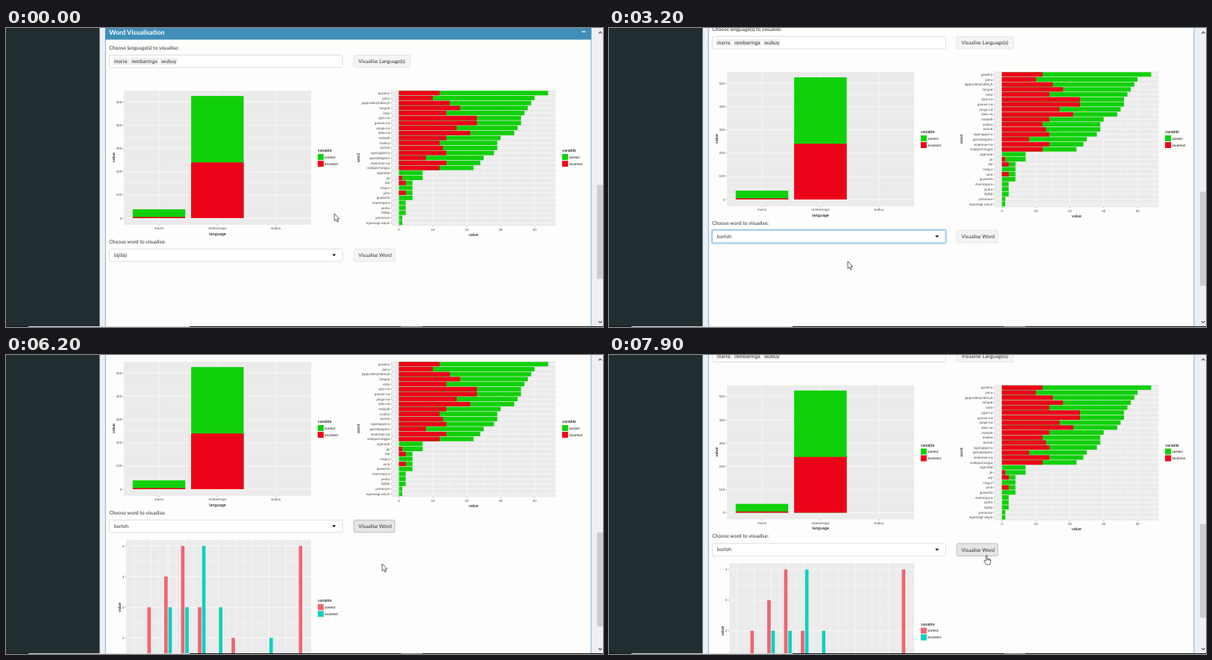
These frames come from a looping animation (800x401 px, 8000 ms). An HTML page:

```html
<!DOCTYPE html>
<html lang="en">
<head>
<meta charset="utf-8">
<title>Word Visualisation</title>
<style>
html, body { margin: 0; width: 100%; height: 100%; overflow: hidden; }
svg { display: block; width: 800px; height: 401px; text-rendering: geometricPrecision; }
text { font-family: "Liberation Sans", Arial, sans-serif; }
.ui { font-family: Lato, "Open Sans", sans-serif; }
</style>
</head>
<body>
<svg id="stage" viewBox="0 0 800 401"></svg>
<script>
const GREEN = '#10d00a', RED = '#ec0219', PINK = '#ee6670', TEAL = '#12cfc0';
const GREY = '#4d4d4d', PAPER = '#fdfdfb';

const rect = (x, y, w, h, fill, extra = '') =>
  `<rect x="${x}" y="${y}" width="${w}" height="${h}" fill="${fill}" ${extra}/>`;
const line = (x1, y1, x2, y2, color, w) =>
  `<path d="M${x1} ${y1}L${x2} ${y2}" stroke="${color}" stroke-width="${w}"/>`;
const shape = (d, fill, extra = '') => `<path d="${d}" fill="${fill}" ${extra}/>`;
const text = (x, y, s, size, fill = '#000', anchor = 'start', extra = '') =>
  `<text x="${x}" y="${y}" font-size="${size}" fill="${fill}" text-anchor="${anchor}" ${extra}>${s}</text>`;
const ui = (x, y, s, extra = '') => text(x, y, s, 6.8, '#333', 'start', 'class="ui" ' + extra);
const group = (id, body, extra = '') => `<g id="${id}" ${extra}>${body}</g>`;
const range = (n, f) => Array.from({ length: n }, (_, i) => f(i)).join('');
const chevron = (x, y, dir, color) =>
  `<path d="M${x - 2.3} ${y + dir}l2.3 ${-2.3 * dir}l2.3 ${2.3 * dir}" fill="none" stroke="${color}" stroke-width="1.1"/>`;

function legend(x, y, colors) {
  return text(x, y + 1.8, 'variable', 5.4) + ['correct', 'incorrect'].map((label, i) =>
    rect(x, y + 4.7 + i * 9, 8, 8, colors[i]) +
    text(x + 9.3, y + 10.3 + i * 9, label, 4.65)).join('');
}

const vertical = (x, y, s) => text(x, y, s, 5.5, '#000', 'middle', `transform="rotate(-90 ${x} ${y})"`);
const xLabel = (x, y, s) => line(x, y - 5, x, y - 3.6, '#555', .5) + text(x, y + 1.5, s, 4.55, GREY, 'middle');
const yLabel = (x, y, s) => line(x - 1.6, y, x, y, '#555', .5) + text(x - 2.8, y + 1.6, s, 4.55, GREY, 'end');

function languageChart() {
  const Y = v => 255 - v * .3115;
  let out = rect(158, 84, 251, 180, '#ebebeb');
  for (let v = 0; v <= 550; v += 50) out += line(158, Y(v), 409, Y(v), '#fff', v % 100 ? .3 : .6);
  [['marra', 38, 5], ['rembarrnga', 526, 240], ['wubuy', 0, 0]].forEach(([name, all, bad], i) => {
    const x = 205 + i * 78.3;
    out += line(x, 84, x, 264, '#fff', .6) + xLabel(x, 268.8, name);
    if (all) out += rect(x - 35.2, Y(all), 70.4, all * .3115, GREEN) +
      rect(x - 35.2, Y(bad), 70.4, bad * .3115, RED);
  });
  return out + range(6, i => yLabel(158, Y(i * 100), i * 100)) +
    text(283.5, 277.5, 'language', 5.5, '#000', 'middle') + vertical(146, 173.5, 'value') +
    legend(417.7, 164.3, [GREEN, RED]);
}

function wordChart() {
  const words = ('guweny 44 12,jamu 40 10,jappurdenyhdenyh 39 15,langoe 38 18,rotto 37 14,giya-na 36 23,' +
    'ganam-na 36 23,janga-na 35 17,dala-na 34 21,mobalh 30 14,mokko 29 12,borloh 29 13,nganapparru 28 14,' +
    'garndoegoen 25 8,moermoe-na 24 14,walppurrunggu 22 12,ngamdal 7 0,jin 7 1,wiji 4 2,magur 4 0,jarlu 4 2,' +
    'guwarda 4 0,marranguru 2 0,janbu 2 0,bijibiji 2 0,yarraman 1 0,ngansagi_wayin 1 0').split(',');
  const unit = 4.545, X = v => 526.5 + v * unit;
  let out = rect(516.5, 83.3, 220, 182, '#ebebeb');
  for (let v = 0; v <= 45; v += 5) out += line(X(v), 83.3, X(v), 265.3, '#fff', v % 10 ? .3 : .6);
  words.forEach((row, i) => {
    const [name, all, bad] = row.split(' '), y = 87.3 + i * 6.69;
    out += line(516.5, y, 736.5, y, '#fff', .6) + rect(X(0), y - 3, all * unit, 6, GREEN) +
      rect(X(0), y - 3, bad * unit, 6, RED) + yLabel(517, y, name.replace('_', ' '));
  });
  return out + range(5, i => xLabel(X(i * 10), 270, i * 10)) +
    text(626.5, 278.5, 'value', 5.5, '#000', 'middle') + vertical(474, 174, 'word') +
    legend(745.2, 164.3, [GREEN, RED]);
}

function levelChart() {
  const X = v => 172 + v * 22.55, Y = v => 495.5 - v * 41.1;
  const good = [0, 2, 3, 4, 2, 0, 1, 0, 0, 0, 4], bad = [0, 0, 2, 2, 4, 2, 0, 0, 1, 0, 0];
  let out = rect(161, 323, 248, 181, '#ebebeb');
  for (let v = 0; v <= 4; v += .5) out += line(161, Y(v), 409, Y(v), '#fff', v % 1 ? .3 : .6);
  for (let v = 0; v <= 10; v += .5) out += line(X(v), 323, X(v), 504, '#fff', v % 1 ? .3 : .6);
  good.forEach((n, i) => {
    out += rect(X(i) - 5.1, Y(n), 4.7, n * 41.1, PINK) +
      rect(X(i) + .5, Y(bad[i]), 4.7, bad[i] * 41.1, TEAL) + xLabel(X(i), 509, i);
  });
  return out + range(5, i => yLabel(161, Y(i), i)) +
    text(285, 518, 'level', 5.5, '#000', 'middle') + vertical(154, 413.5, 'value') +
    legend(417.7, 404.5, [PINK, TEAL]);
}

const button = (id, y, w, label) =>
  rect(466, y, w, 16.5, '#f4f4f4', `id="${id}" rx="1.5" stroke="#ddd" stroke-width=".7"`) + ui(472.3, y + 10.6, label);
const field = (id, y) => rect(138.4, y, 312.5, 16.6, '#fff', `id="${id}" rx="1.8" stroke="#d2d2d2" stroke-width=".7"`);

function dropdown() {
  const options = ['bijibiji', 'borloh', 'dala-na', 'ganam-na', 'garndoegoen', 'giya-na', 'guwarda', 'guweny'];
  return rect(137.4, 317, 314.4, 99.5, '#000', 'opacity=".08" rx="2"') +
    rect(138.4, 316, 312.5, 98.7, '#fff', 'stroke="#d0d0d0" stroke-width=".7"') +
    rect(139, 317.5, 301, 13, '#f5f5f5', 'id="hover"') +
    group('', options.map((s, i) => ui(144.7, 326.2 + i * 13, s)).join(''), 'clip-path="url(#list)"') +
    rect(440, 316.5, 10.4, 97.8, '#f1f1f1') + rect(440.4, 325.5, 9.6, 19.5, '#c4c4c4') +
    chevron(445.2, 320.5, 1, '#555') + chevron(445.2, 409.5, -1, '#555');
}

const page =
  rect(133.3, -14, 650.7, 540, PAPER, 'rx="1.5" stroke="#7fb2d0" stroke-width="1"') +
  rect(133, -14, 651.3, 29.6, '#418fb8') +
  text(138.2, 8.7, 'Word Visualisation', 8.9, '#fff', 'start', 'class="ui" font-weight="700"') +
  rect(771.5, 4.3, 5, 1.3, '#fff') +
  ui(138.2, 29, 'Choose language(s) to visualise:') + field('langs', 36.4) +
  rect(143.3, 39.8, 22, 9.6, '#efefef') + rect(166.7, 39.8, 38, 9.6, '#efefef') + rect(206.3, 39.8, 23, 9.6, '#efefef') +
  ui(145, 47, 'marra') + ui(168.2, 47, 'rembarrnga') + ui(208, 47, 'wubuy') +
  button('langButton', 36.5, 76, 'Visualise Language(s)') +
  languageChart() + wordChart() +
  ui(138.2, 288.7, 'Choose word to visualise:') +
  rect(137.2, 295.2, 314.9, 19, 'none', 'id="glow" rx="2.5" stroke="#b5daee" stroke-width="1.4"') +
  field('select', 296.3) + ui(144.7, 306.9, '', 'id="value"') +
  rect(162.3, 300.5, .6, 8.5, '#222', 'id="caret"') + shape('', '#222', 'id="arrow"') +
  button('wordButton', 296.4, 55, 'Visualise Word') +
  group('levels', levelChart()) + group('menu', dropdown());

const outline = 'stroke="#222" stroke-width=".7" stroke-linejoin="round"';
const pointers =
  group('arrowPointer', shape('M0 0V9.7L2.3 7.6L3.9 11.2L5.4 10.5L3.9 7H6.8Z', '#fff', outline)) +
  group('handPointer', shape('M-1 .4Q0 -.8 .9 .4V4.3L4.4 5Q5.8 5.3 5.7 6.8L5.2 9.5L4.4 12H-.6L-3.3 7.5Q-3.4 6 -2 6.5L-1 7.5Z', '#fff', outline) +
    shape('M1 4.3V6.4M2.6 4.7V6.5M4.2 5V6.7', 'none', outline)) +
  group('beamPointer', shape('M-2.3 -5H2.3M0 -5V5M-2.3 5H2.3', 'none', 'stroke="#111" stroke-width="1.1"'));

stage.innerHTML = '<defs><clipPath id="list"><rect x="138" y="316" width="303" height="98"/></clipPath></defs>' +
  rect(0, 0, 800, 401, '#ecf0f5') + group('page', page) + rect(0, 0, 125.5, 401, '#222d32') +
  rect(791.5, 0, 8.5, 401, '#f0f0f0') + rect(792, 0, 8, 126, '#cdcdcd', 'id="thumb"') +
  chevron(796.3, 6.3, 1, '#505050') + chevron(796.3, 394.2, -1, '#505050') +
  rect(0, 400, 800, 1, '#161616') + rect(30, 400, 216, 1, '#d8d8d8') + rect(529, 400, 29, 1, '#777') +
  group('pointer', pointers);

const $ = id => document.getElementById(id);
const show = (id, on) => $(id).setAttribute('display', on ? 'inline' : 'none');
const set = (id, attrs) => { for (const k in attrs) $(id).setAttribute(k, attrs[k]); };

// Each key is [time, ...values]; values ease between keys.
function track(keys, t) {
  const i = keys.findIndex(k => k[0] > t);
  if (i < 0) return keys[keys.length - 1].slice(1);
  const a = keys[i - 1], b = keys[i], u = (t - a[0]) / (b[0] - a[0]), e = u * u * (3 - 2 * u);
  return a.slice(1).map((v, j) => v + (b[j + 1] - v) * e);
}

const scrollKeys = [[0, 0], [300, 0], [500, 25], [5800, 25], [6000, 75], [6400, 75], [6600, 125],
  [6700, 125], [6900, 143.5], [7300, 143.5], [7500, 93.5], [7600, 93.5], [7800, 43.5]];
const pointerKeys = [[0, 440, 249], [200, 440, 249], [1000, 430, 282], [1900, 430, 282], [2400, 345, 333],
  [2800, 320, 313], [3700, 320, 313], [4400, 504, 281], [5400, 504, 281], [5800, 504, 280],
  [6400, 504, 280], [6800, 506, 269]];

function draw(t) {
  const [scroll] = track(scrollKeys, t), [x, y] = track(pointerKeys, t), py = y + scroll;
  const open = t >= 1200 && t < 2900, focus = t >= 1200 && t < 5000;
  const inSelect = x > 138 && x < 451 && py > 296 && py < 313;
  const overButton = x > 466 && x < 521 && py > 296 && py < 313;
  const inMenu = open && x < 440 && py > 317 && py < 414;
  const row = inMenu ? Math.floor((py - 317.5) / 13) : 0;

  set('page', { transform: `translate(0 ${-scroll})` });
  set('thumb', { y: 210.5 + scroll * .366 });
  show('menu', open);
  show('caret', open);
  show('glow', focus);
  show('levels', t >= 5600);
  set('hover', { y: 317.5 + Math.max(row, 0) * 13 });
  set('select', { stroke: focus ? '#62a9d2' : '#d2d2d2' });
  set('arrow', { d: open ? 'M437 306.2h5.2l-2.6-3z' : 'M437 303.2h5.2l-2.6 3z' });
  $('value').textContent = t < 2900 ? 'bijibiji' : 'borloh';
  const active = overButton || t >= 5000;
  set('wordButton', { fill: active ? '#e6e6e6' : '#f4f4f4', stroke: active ? '#a5a5a5' : '#ddd' });

  const hand = overButton || inMenu, beam = inSelect && !hand;
  show('handPointer', hand);
  show('beamPointer', beam);
  show('arrowPointer', !hand && !beam);
  set('pointer', { transform: `translate(${x} ${y})` });
}

const start = performance.now();
function tick() {
  const t = (performance.now() - start) % 8000;
  draw(Math.floor(t / 100) * 100);
  requestAnimationFrame(tick);
}
tick();
</script>
</body>
</html>
```
